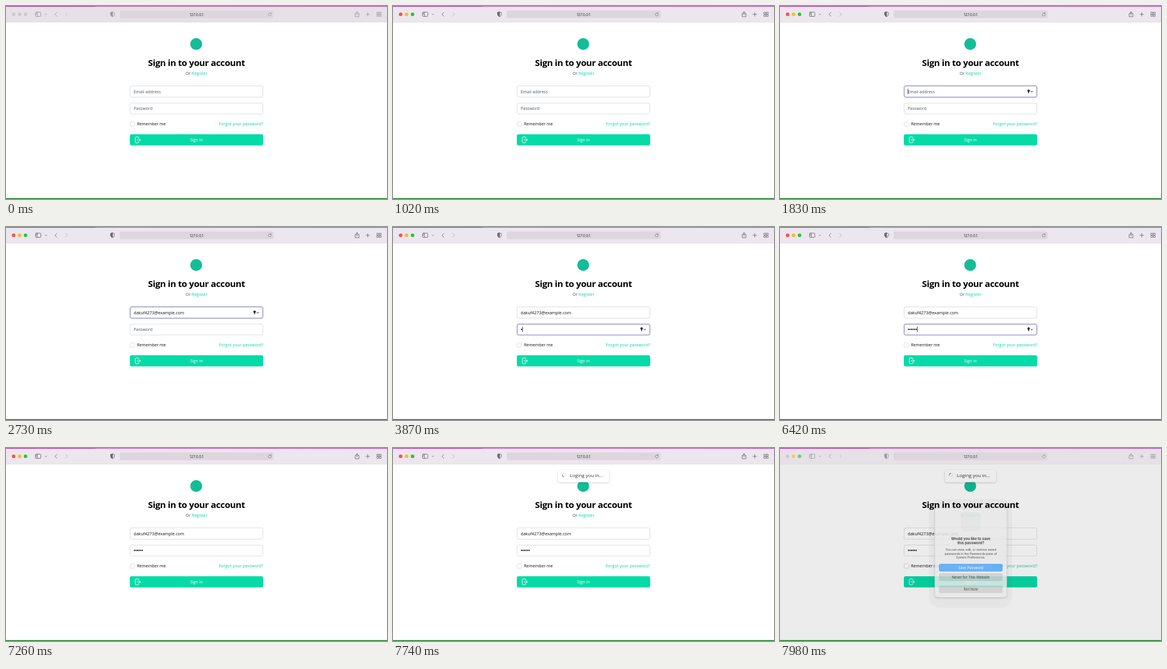
Recreate the animation shown at these times as an HTML page. Size 640 by 325 pixels, loop 8000 ms.

```html
<!DOCTYPE html>
<html lang="en">
<head>
<meta charset="utf-8">
<title>Sign in</title>
<style>
  html, body { margin: 0; width: 100%; height: 100%; overflow: hidden; background: #fff; }
  svg { display: block; width: 100vw; height: 100vh; }
  text { font: 7px "Open Sans", sans-serif; fill: #4b5563; white-space: pre; }
  .mid { text-anchor: middle; }
  .title { font-size: 15px; font-weight: 700; letter-spacing: -.025em; fill: #000; }
  .link { font-weight: 500; fill: #05d3a4; }
  .dark { fill: #111; }
  .field { fill: #fff; stroke: #d3d6db; stroke-width: .8; }
  .field.on { stroke: #7672ad; stroke-width: 1; }
  .icon { fill: none; stroke: #6f6873; stroke-width: .9; stroke-linecap: round; stroke-linejoin: round; }
  .ui { font-family: Inter, sans-serif; font-size: 5.85px; text-anchor: middle; fill: #333; }
</style>
</head>
<body>
<svg viewBox="0 0 640 325" preserveAspectRatio="none">
  <defs>
    <linearGradient id="desk">
      <stop offset="0" stop-color="#b03ca4"/>
      <stop offset=".23" stop-color="#a83b9c"/>
      <stop offset=".24" stop-color="#c766b6"/>
      <stop offset="1" stop-color="#b452b0"/>
    </linearGradient>
    <filter id="soft" x="-20%" y="-40%" width="140%" height="200%">
      <feDropShadow dx="0" dy="1" stdDeviation="1.6" flood-opacity=".22"/>
    </filter>
    <g id="key">
      <circle cx="417.6" cy="142.7" r="2" fill="#111"/>
      <path d="M417.6 143v4" stroke="#111" stroke-width="1.3"/>
      <path d="M421.2 143.3l1.7 1.7 1.7-1.7" fill="none" stroke="#111" stroke-width="1"/>
    </g>
  </defs>

  <rect width="640" height="325" fill="#fff"/>

  <!-- form -->
  <circle cx="319.5" cy="64" r="10" fill="#12bd98"/>
  <text class="title mid" x="320" y="101.2">Sign in to your account</text>
  <text class="mid" x="320" y="116">Or <tspan class="link">Register</tspan></text>

  <rect id="mailBox" class="field" x="208.5" y="134.5" width="223" height="19" rx="2.5"/>
  <text id="mail" x="214.6" y="146.5"></text>
  <use id="mailKey" href="#key"/>

  <rect id="passBox" class="field" x="208.5" y="163.5" width="223" height="18.4" rx="2.5"/>
  <text id="hint" x="214.6" y="175.1">Password</text>
  <g id="dots"></g>
  <use id="passKey" href="#key" y="28.4"/>
  <rect id="caret" width=".8" height="9" fill="#111"/>

  <rect x="208.5" y="195" width="7.6" height="7.6" rx="1.8" fill="#fff" stroke="#d3d6db" stroke-width=".8"/>
  <text class="dark" x="220" y="201.3">Remember me</text>
  <text class="link" x="432" y="201.3" text-anchor="end">Forgot your password?</text>

  <rect x="208" y="216" width="224" height="18.8" rx="3" fill="#04dba7"/>
  <path class="icon" style="stroke:#fff" d="M223 223v-1.2q0-1.3-1.3-1.3h-3.2q-1.3 0-1.3 1.3v7.2q0 1.3 1.3 1.3h3.2q1.3 0 1.3-1.3v-1.2M220.2 225.4h5.6M224 223.6l1.8 1.8-1.8 1.8"/>
  <text class="mid" x="320" y="227.8" style="fill:#fff;font-weight:500">Sign in</text>

  <!-- notice -->
  <g id="toast">
    <rect x="277" y="37" width="86" height="20.5" rx="3" fill="#fff" filter="url(#soft)"/>
    <circle cx="287" cy="45.5" r="2.8" fill="none" stroke="#ddd" stroke-width=".9"/>
    <path id="spin" d="M287 42.7a2.8 2.8 0 0 0-2.8 2.8" fill="none" stroke="#555" stroke-width=".9"/>
    <text x="297" y="48.8" style="font-size:8px;fill:#363636">Loging you in...</text>
  </g>
  <rect id="dim" y="27" width="640" height="297" fill="#111"/>

  <!-- browser bar -->
  <rect id="bar" width="640" height="27.2"/>
  <rect y="26.8" width="640" height=".6" fill="#d8d1d9"/>
  <rect width="640" height="1.2" fill="url(#desk)"/>
  <g id="lights"></g>
  <rect x="191" y="7.5" width="258.5" height="13" rx="3" fill="#ddd6df"/>
  <text class="ui" x="320" y="16.7" style="font-size:6.1px">127.0.0.1</text>
  <g id="tools" class="icon">
    <rect x="49.5" y="10.3" width="9" height="7.2" rx="1.3"/>
    <path d="M52.6 10.3v7.2M50.7 12.2h.7M50.7 13.8h.7"/>
    <path d="M65.6 13.3l1.5 1.5 1.5-1.5" stroke-width=".8"/>
    <path d="M85.4 10.8L82.3 14l3.1 3.2"/>
    <path d="M100.2 10.8l3.1 3.2-3.1 3.2" opacity=".45"/>
    <path d="M179 10l3.2 1.2v2.6q0 2.8-3.2 4.2-3.2-1.4-3.2-4.2v-2.6z"/>
    <path d="M179 10v8q-3.2-1.4-3.2-4.2v-2.6z" fill="#6f6873"/>
    <path d="M445 12.6a2.5 2.5 0 1 0 .6 1.8M443.6 12.7h1.6v-1.7" stroke-width=".7"/>
    <path d="M588.3 12.6h-1.8v5.4h6.4v-5.4h-1.8M589.7 15V9.7M587.9 11.3l1.8-1.8 1.8 1.8"/>
    <path d="M604.7 14h6M607.7 11v6"/>
    <path d="M623.3 10.5h2.8v2.8h-2.8zM627.4 10.5h2.8v2.8h-2.8zM623.3 14.6h2.8v2.8h-2.8zM627.4 14.6h2.8v2.8h-2.8z" stroke-width=".8"/>
  </g>

  <!-- save sheet -->
  <g id="sheet">
    <rect x="250" y="86" width="140" height="183" rx="19" fill="#000" opacity=".035"/>
    <rect x="260" y="101" width="121" height="150.5" rx="5" fill="#e9e9ea" stroke="#cfcfcf" stroke-width=".7" filter="url(#soft)"/>
    <rect x="305.5" y="109" width="29.5" height="30" rx="4" fill="#e5e5e6" stroke="#d7d7d8" stroke-width=".6"/>
    <g id="ask"></g>
    <g id="choices"></g>
  </g>

  <rect y="323.6" width="640" height="1.4" fill="#12781a"/>
</svg>

<script>
const LOOP = 8000;
const MAIL = "dakuf4273@example.com";
const AT = { active: 420, mail: 1560, fill: 2140, pass: 3270, type: 3750, gap: 500, blur: 6870, toast: 7590, sheet: 7800 };
const LIGHTS = ["#fb4f4b", "#fdb92f", "#2ac33d"];

const $ = id => document.getElementById(id);
const show = (id, on) => $(id).setAttribute("visibility", on ? "visible" : "hidden");
const fade = (id, v) => $(id).setAttribute("opacity", v);

function add(parent, tag, attrs, label) {
  const el = document.createElementNS("http://www.w3.org/2000/svg", tag);
  for (const k in attrs) el.setAttribute(k, attrs[k]);
  if (label) el.textContent = label;
  return $(parent).appendChild(el);
}

const lights = LIGHTS.map((c, i) => add("lights", "circle", { cx: 12.8 + 10 * i, cy: 14, r: 3 }));
const dots = Array.from({ length: 6 }, (_, i) =>
  add("dots", "circle", { cx: 215.8 + 2.6 * i, cy: 172.4, r: 1.05, fill: "#111" }));

["Would you like to save", "this password?"].forEach((s, i) =>
  add("ask", "text", { class: "ui", x: 320.5, y: 154.7 + 7.5 * i, style: "font-size:6.1px;font-weight:700" }, s));
["You can view, edit, or remove saved", "passwords in the Passwords pane of", "System Preferences."].forEach((s, i) =>
  add("ask", "text", { class: "ui", x: 320.5, y: 173 + 6.6 * i, style: "font-size:5.05px" }, s));
[["Save Password", 195, "#56a8f8", "#fff"], ["Never for This Website", 211, "#cfcfd1", "#333"], ["Not Now", 231.5, "#cfcfd1", "#333"]]
  .forEach(([s, y, bg, ink]) => {
    add("choices", "rect", { x: 267, y, width: 107, height: 13, rx: 3, fill: bg });
    add("choices", "text", { class: "ui", x: 320.5, y: y + 8.6, style: `fill:${ink}` }, s);
  });

function draw(t) {
  const sheet = Math.min(1, Math.max(0, (t - AT.sheet) / 180));
  const active = t >= AT.active && sheet < .5;
  const filled = t >= AT.fill;
  const onMail = t >= AT.mail && t < AT.pass;
  const onPass = t >= AT.pass && t < AT.blur;
  const typed = Math.min(6, Math.max(0, Math.floor((t - AT.type) / AT.gap) + 1));

  $("bar").setAttribute("fill", active ? "#ece6ee" : "#e6e1e6");
  fade("tools", active ? 1 : .6);
  lights.forEach((el, i) => el.setAttribute("fill", active || (sheet && i) ? LIGHTS[i] : "#cdc8ce"));
  lights.forEach((el, i) => el.setAttribute("opacity", 1 - .35 * sheet * (i > 0)));

  $("mailBox").classList.toggle("on", onMail);
  $("passBox").classList.toggle("on", onPass);
  $("mail").textContent = filled ? MAIL : "Email address";
  $("mail").classList.toggle("dark", filled);
  show("mailKey", onMail);
  show("passKey", onPass);
  show("hint", !typed);
  dots.forEach((el, i) => el.setAttribute("visibility", i < typed ? "visible" : "hidden"));

  // The caret restarts its blink after each edit.
  const edit = onMail ? (filled ? AT.fill : AT.mail) : typed ? AT.type + (typed - 1) * AT.gap : AT.pass;
  show("caret", (onMail || onPass) && (t - edit) % 1000 < 540);
  $("caret").setAttribute("x", onMail ? (filled ? 300 : 214.6) : 214.7 + 2.6 * typed);
  $("caret").setAttribute("y", onMail ? 139.5 : 167.8);

  const toast = Math.min(1, Math.max(0, (t - AT.toast) / 150));
  fade("toast", toast);
  $("toast").setAttribute("transform", `translate(0 ${-12 * (1 - toast) ** 2})`);
  $("spin").setAttribute("transform", `rotate(${(t - AT.toast) * .36 - 140} 287 45.5)`);
  fade("dim", .08 * sheet);
  fade("sheet", .86 * sheet);
}

const start = performance.now();
function tick() {
  draw((performance.now() - start) % LOOP);
  requestAnimationFrame(tick);
}
draw(0);
requestAnimationFrame(tick);
</script>
</body>
</html>
```
